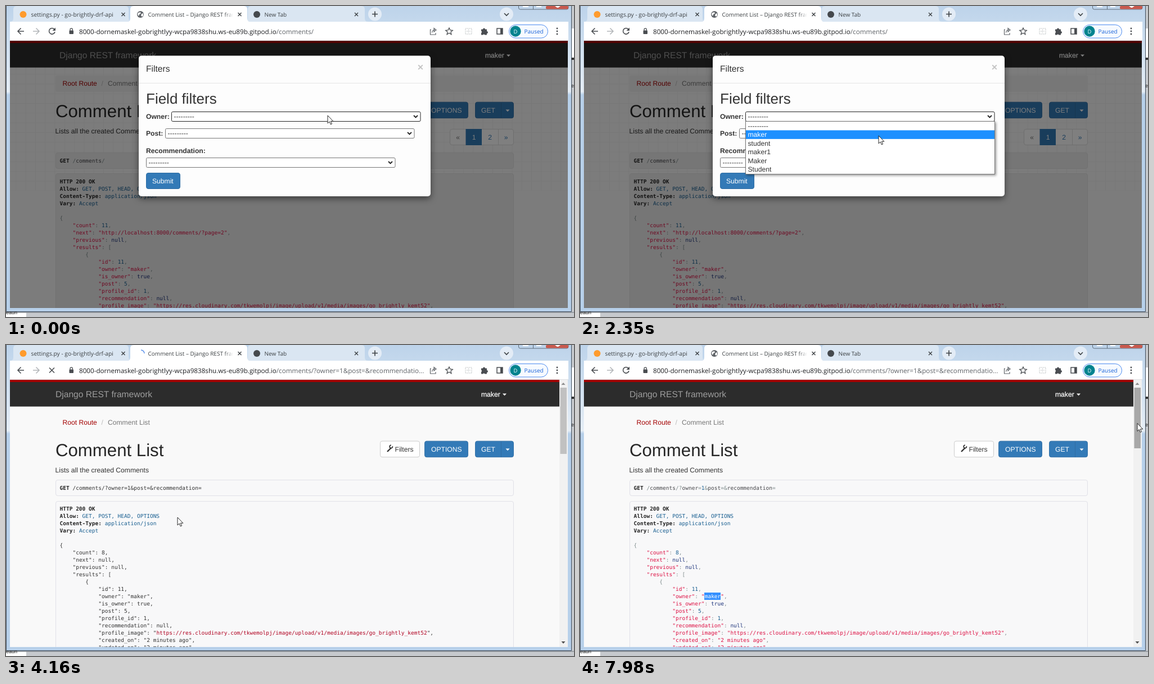
These frames come from a looping animation (1010 px wide and 554 px high, 8 s). An HTML page:

```html
<!DOCTYPE html>
<html lang="en">
<head>
<meta charset="utf-8">
<style>
html, body { margin: 0; width: 100%; height: 100%; overflow: hidden; background: #fff; }
svg { display: block; width: 1010px; height: 554px; }
text { font-family: "Liberation Sans", Arial, sans-serif; white-space: pre; text-rendering: geometricPrecision; }
.ui { font-family: "Open Sans", "Noto Sans", sans-serif; }
.mono { font-family: "DejaVu Sans Mono", monospace; }
.plain .tok { fill: #333; }
.plain .url { fill: #b00020; }
.hover .url { text-decoration: underline; }
#modalBox { filter: drop-shadow(0 4px 6px rgba(0,0,0,.5)); }
#list { filter: drop-shadow(2px 2px 2px rgba(0,0,0,.4)); }
</style>
</head>
<body>
<svg id="stage" viewBox="0 0 1010 554"></svg>
<script>
const BASE = 12.14, RED = '#dd1144', LIT = '#195f91', BLUE = '#337ab7';
const OPTIONS = ['---------', 'maker', 'student', 'maker1', 'Maker', 'Student'];
const HOST = '8000-dornemaskel-gobrightlyy-wcpa9838shu.ws-eu89b.gitpod.io';
const IMAGE = 'https://res.cloudinary.com/tkwemolpj/image/upload/v1/media/images/go_brightly_kemt52';
const safe = s => s.replace(/&/g, '&amp;');

const text = (x, y, s, size = BASE, fill = '#333', more = '') =>
  `<text x="${x}" y="${y}" font-size="${size}" fill="${fill}" ${more}>${s}</text>`;
const ui = (x, y, s, size = 10, fill = '#3c4043', more = '') => text(x, y, s, size, fill, `class="ui" ${more}`);
const rect = (x, y, w, h, fill, more = '') =>
  `<rect x="${x}" y="${y}" width="${w}" height="${h}" fill="${fill}" ${more}/>`;
const line = (d, color = '#5f6368', width = 1.5, more = '') =>
  `<path d="${d}" fill="none" stroke="${color}" stroke-width="${width}" ${more}/>`;
const shape = (d, fill, more = '') => `<path d="${d}" fill="${fill}" ${more}/>`;
const dot = (x, y, r, fill, more = '') => `<circle cx="${x}" cy="${y}" r="${r}" fill="${fill}" ${more}/>`;
const group = (id, body, more = '') => `<g id="${id}" ${more}>${body}</g>`;
const span = (s, fill, cls = 'tok') => `<tspan class="${cls}" fill="${fill}">${safe(s)}</tspan>`;
const bold = s => `<tspan font-weight="700" fill="#222">${s}</tspan>`;
const caret = (x, y, fill) => shape(`M${x - 3.5} ${y - 1.5}h7l-3.5 3.7z`, fill);
const mono = (y, s) => text(95.5, y, s, 9.53, '#333', 'class="mono"');

// Syntax colouring
function paint(s) {
  return s.replace(/"[^"]*"|\d+|[a-z_]+|[^"\da-z_]+/g, m => {
    if (m.startsWith('"http')) return span('"', RED) + span(m.slice(1, -1), RED, 'tok url') + span('"', RED);
    if (m[0] === '"') return span(m, RED);
    if (/\d/.test(m)) return span(m, LIT);
    if (/^(null|true)$/.test(m)) return span(m, '#1e347b');
    return span(m, /[a-z]/.test(m) ? '#48484c' : '#7f8c8c');
  });
}

function response(count, next) {
  const head = [['Allow', 'GET, POST, HEAD, OPTIONS'], ['Content-Type', 'application/json'], ['Vary', 'Accept']]
    .map(([k, v]) => bold(k + ':') + span(' ' + v, LIT, ''));
  const top = [`"count": ${count},`, `"next": ${next},`, '"previous": null,', '"results": [', '    {'];
  const item = ['"id": 11,', '"owner": "maker",', '"is_owner": true,', '"post": 5,', '"profile_id": 1,',
    '"recommendation": null,', `"profile_image": "${IMAGE}",`, '"created_on": "2 minutes ago",', '"updated_on": "2 minutes ago",'];
  return [bold('HTTP 200 OK'), ...head, '', paint('{'),
    ...top.map(s => paint('    ' + s)), ...item.map(s => paint(' '.repeat(12) + s))];
}

function page(dim) {
  const shift = dim ? 21 : 0, nav = dim ? 7 : 0, right = dim ? 999 : 984;
  const well = dim ? '#ededed' : '#f8f8f9', edge = `stroke="${dim ? '#e4e4e4' : '#e1e1e8'}"`;
  const button = (x, w) => rect(x + .5, 171.2, w, 28.5, BLUE, 'rx="3.5" stroke="#2e6da4" stroke-width=".9"');
  let s = rect(7, 62, 992, 476, '#f9f9f9');
  if (dim) s += rect(7, 109, 992, 220, 'url(#grid)');
  s += rect(7, 62, right - 7, 47.6, '#2c2c2c') + rect(7, 62, right - 7, 4, '#a30000')
    + text(88 + nav, 92.5, 'Django REST framework', 15.6, '#9d9d9d')
    + text(845 + nav, 92, 'maker', BASE, '#fff', 'stroke="#fff" stroke-width=".25"') + caret(886.5 + nav, 88, '#fff')
    + rect(88, 123.5, 815, 29.5, dim ? '#efefef' : '#f9f9f9', 'rx="3.5"')
    + text(100.5, 142, 'Root Route', BASE, '#a30000') + text(169.5, 142, '/', BASE, '#bbb')
    + text(181, 142, 'Comment List', BASE, '#777')
    + text(88, 198, 'Comment List', 31.2, '#262626') + text(87.5, 227, 'Lists all the created Comments')
    + rect(665.5, 171.2, 70, 28.5, '#fff', 'rx="3.5" stroke="#ccc"') + text(691.5, 190, 'Filters')
    + line('M678 190l6.5-6.5', '#333', 2.4) + line('M687.3 180.4a2.6 2.6 0 1 1-2.5-2', '#333', 1.8)
    + button(744, 77) + text(756, 190, 'OPTIONS', BASE, '#fff')
    + button(834, 68) + text(845, 190, 'GET', BASE, '#fff') + line('M880.5 172v28', '#2e6da4', 1) + caret(892, 186, '#fff');
  if (dim) {
    s += rect(789.5, 219.5, 113, 28, '#fff', 'rx="3.5" stroke="#ddd"') + line('M875.5 219v29', '#ddd', 1)
      + rect(817.5, 219, 28.5, 29, BLUE)
      + ['«', '1', '2', '»'].map((c, i) => text(803.5 + i * 28.5, 238, c, BASE, ['#777', '#fff', BLUE, BLUE][i], 'text-anchor="middle"')).join('');
  }
  const query = dim ? '' : '?owner=1&post=&recommendation=';
  s += rect(88.5, 240.5 + shift, 814, 28, well, `rx="3.5" ${edge}`)
    + mono(257.5 + shift, bold('GET') + paint(' /comments/' + query))
    + rect(88.5, 278.5 + (dim ? 20 : 0), 814, 300, well, `rx="3.5" ${edge}`)
    + response(dim ? 11 : 8, dim ? '"http://localhost:8000/comments/?page=2"' : 'null')
      .map((l, i) => mono(295 + shift + 13 * i, l)).join('');
  return s + (dim ? rect(7, 62, 992, 476, '#000', 'opacity=".5"') : '');
}

const select = (x, y, value, id) =>
  rect(x + .5, y + .5, 442.5, 17, '#fff', `id="${id}" rx="2" stroke="#767676"`)
  + text(x + 4.5, y + 13, value, BASE, '#333', `id="${id}Text"`)
  + line(`M${x + 431} ${y + 7}l3.5 3.5 3.5-3.5`, '#222', 1.8);
const label = (y, s) => text(249, y, s, BASE, '#333', 'font-weight="700"');

const modal = group('modalBox', rect(236, 88.5, 519, 250.5, '#fdfdfd', 'rx="5"'))
  + text(249, 117, 'Filters', 15.6) + text(737, 115, '×', 18, '#c4c4c4', 'text-anchor="middle" font-weight="700"')
  + rect(236, 137, 519, 1, '#e5e5e5') + text(249, 174, 'Field filters', 26)
  + label(201, 'Owner:') + select(294, 188, OPTIONS[0], 'owner')
  + label(231, 'Post:') + select(283, 218, OPTIONS[0], 'post')
  + label(262, 'Recommendation:') + select(249, 270, OPTIONS[0], 'rec')
  + group('ring', rect(248.5, 296.5, 62, 30, '#fff', 'rx="4.5" stroke="#111"'))
  + rect(249.5, 297.5, 60, 28, BLUE, 'id="submit" rx="3.5" stroke="#2e6da4"')
  + text(260, 315.5, 'Submit', BASE, '#fff')
  + group('list', rect(294.5, 205.5, 443, 94, '#fff', 'stroke="#767676"')
    + rect(295, 206, 442, 15.5, '#1e90ff', 'id="pick"')
    + OPTIONS.map((s, i) => text(298.5, 218 + 15.4 * i, s, BASE, '#333', 'class="option"')).join(''));

const cross = x => line(`M${x - 3} 12l6 6m0-6l-6 6`, '#3c4043', 1.4);
const frame = rect(0, 0, 1010, 554, '#c6c9cd')
  + rect(1006, 40, 4, 52, '#fff') + rect(1006, 92, 4, 4, '#333')
  + text(1005, 145, 'e', 9, '#222')
  + rect(0, 0, 1005.5, 545, 'url(#glass)') + line('M.5 0V544.5H1005.5V0', '#3f4d5c', 1)
  + rect(0, 546, 36, 8, '#fff') + rect(0, 545, 1010, 1.5, '#8d939a') + text(0, 549, 'eaun', 9, '#222');
const controls = line('M911.5 0V3q0 3 3 3H997q3 0 3-3V0M937.5 0V6', '#5d6b7a', 1)
  + rect(960, 0, 40, 5.5, '#c9594d', 'rx="2"') + rect(919, 0, 10, 2, '#fff') + rect(943, 0, 9, 2, '#fff')
  + shape('M976 0l4 3h2l4-3z', '#fff');

const tabs = shape('M7 28q6 0 6-6V6q0-6 6-6H212q6 0 6 6V22q0 6 6 6z', '#dae6f2')
  + shape('M424 28q6 0 6-6V6q0-6 6-6H632q6 0 6 6V22q0 6 6 6z', '#dae6f2')
  + shape('M214 29q7 0 7-7V6q0-6 6-6H423q6 0 6 6V22q0 7 7 7z', '#fff')
  + dot(30.5, 15, 6, '#ff9b2d') + ui(44.5, 18.5, 'settings.py - go-brightly-drf-api', 10.25)
  + dot(446, 15, 6, '#45494d') + ui(459.5, 18.5, 'New Tab')
  + cross(208.5) + cross(415.5) + cross(623)
  + group('globe', dot(239, 15, 6, '#5f6368') + shape('M235 12l4-1 1 2-3 2-1 3-2-3zM241 14l3-1 0 4-2 2-2-2z', '#fff'))
  + group('spinner', line('M240 9a6 6 0 0 1 6 6', '#5c92ea', 1.6))
  + ui(252.5, 18.5, '', 10, '#3c4043', 'id="title" clip-path="url(#tabClip)"') + rect(388, 6, 16, 18, 'url(#fade)')
  + dot(656, 14.5, 12, '#e3ecf6') + line('M651 14.5h10m-5-5v10', '#3c4043', 1.6)
  + dot(890, 14.5, 12, '#e3ecf6') + line('M886 13l4 4 4-4', '#3c4043', 1.6);

const toolbar = rect(7, 28, 993, 34, '#fff') + rect(7, 61, 993, 1, '#dcdfe3')
  + line('M32 45H21m5.5-5.5l-5.5 5.5 5.5 5.5', '#4a4d51', 1.6)
  + line('M48 45h11m-5.5-5.5l5.5 5.5-5.5 5.5', '#b4b7ba', 1.6)
  + group('reload', line('M86 41.5a5.3 5.3 0 1 0 1 4.5', '#4a4d51', 1.6) + shape('M88 38.5v5.5h-5.5z', '#4a4d51'))
  + group('stop', line('M77 40.5l9 9m0-9l-9 9', '#4a4d51', 1.6))
  + rect(112.5, 43.5, 7.5, 6.5, '#4a4d51', 'rx="1"') + line('M114 44v-2a2.2 2.2 0 0 1 4.4 0v2', '#4a4d51', 1.2)
  + text(130, 49.5, span(HOST, '#202124', '') + '<tspan id="path"></tspan>', 11.67, '#5f6368', 'class="ui"')
  + line('M756 42h-1.5v9h9.5v-3M757.5 47.5q.5-5 5.5-5M761 39.500l4 3.2-4 3.2z', '#5f6368', 1.2)
  + line('M788 39l1.8 4 4.4.4-3.3 2.9 1 4.3-3.9-2.3-3.9 2.3 1-4.3-3.3-2.9 4.4-.4z', '#4a4d51', 1.3)
  + line('M817 40h11v10h-11zM819 45h7m-3.5-3.5v7', '#d5d7d9', 1.5, 'stroke-dasharray="2 1"')
  + shape('M845 41.5h3a2 2 0 0 1 4 0h3v3.5a2 2 0 0 1 0 4v2.5h-3.5a2 2 0 0 0-3.5 0h-3v-3.5a2 2 0 0 0 0-3.5z', '#4a4d51')
  + line('M873 40h10v10h-10z', '#4a4d51', 1.5) + rect(879, 40, 4, 10, '#4a4d51')
  + rect(894.5, 33.5, 69, 23.5, '#f6faff', 'rx="11.7" stroke="#4b8bf0"')
  + dot(906, 45, 9.7, '#00838f') + ui(906, 48.5, 'D', 9.5, '#fff', 'text-anchor="middle"')
  + ui(921.5, 48.5, 'Paused', 10, '#1a63d8')
  + [40, 45, 50].map(y => dot(980, y, 1.4, '#4a4d51')).join('');

const scrollbar = rect(984, 62, 15, 476, '#f1f1f1') + rect(985.5, 76, 11.5, 118, '#c1c1c1', 'id="thumb"')
  + shape('M987.5 71h7l-3.5-4z', '#8c8c8c') + shape('M987.5 528h7l-3.5 4z', '#505050');

const pointer = group('arrow', shape('M0 0V14l3.2-3 2.1 5 2.2-1-2.1-4.7H9.8z', '#fff', 'stroke="#111" stroke-width=".9"'))
  + group('beam', line('M-3-6.5h2.2l.8.8.8-.8H3M0-6V6M-3 6.5h2.2l.8-.8.8.8H3', '#111', 1))
  + group('hand', shape('M-1 0q1.2-1 2.2 0v6l6 1.5q1 .5.8 2l-1 6.5h-7l-4-6q0-1.5 2-1l1 1z', '#fff', 'stroke="#111" stroke-width=".9"'));

document.getElementById('stage').innerHTML = `<defs>
  <linearGradient id="glass" x2="0" y2="1"><stop offset="0" stop-color="#bdd3ea"/><stop offset=".06" stop-color="#c5d9ed"/>
    <stop offset=".28" stop-color="#e6eef6"/><stop offset=".29" stop-color="#b7d0ea"/><stop offset="1" stop-color="#b7d0ea"/></linearGradient>
  <linearGradient id="fade"><stop offset="0" stop-color="#fff" stop-opacity="0"/><stop offset="1" stop-color="#fff"/></linearGradient>
  <pattern id="grid" width="17.3" height="17.3" patternUnits="userSpaceOnUse">${line('M0 .5H18M.5 0V18', '#f0f0f0', 1)}</pattern>
  <clipPath id="tabClip"><rect x="250" y="0" width="154" height="28"/></clipPath>
  <clipPath id="view"><rect x="7" y="62" width="992" height="476"/></clipPath></defs>`
  + frame + controls + tabs + toolbar
  + `<g clip-path="url(#view)">`
  + group('before', page(true) + modal)
  + group('after', page(false) + scrollbar
    + group('marked', rect(221, 441, 29, 13, '#3390ff') + text(221.7, 451, 'maker', 9.53, '#fff', 'class="mono"')))
  + '</g>' + group('cursor', pointer);

const $ = id => document.getElementById(id);
const show = (id, on) => $(id).setAttribute('visibility', on ? 'inherit' : 'hidden');
const fill = (id, color) => $(id).setAttribute('fill', color);
const write = (id, s) => { if ($(id).textContent !== s) $(id).textContent = s; };

// Pointer moves: start, end, steps, target x, target y
const MOVES = [
  [1020, 1270, 5, 531, 243], [1680, 1930, 4, 531, 237], [2240, 2350, 3, 531, 231], [3000, 3530, 10, 305, 307],
  [4890, 5310, 8, 272, 510], [5370, 5670, 6, 235, 462], [5750, 6110, 7, 235, 447.5],
  [6960, 7140, 4, 892, 218], [7320, 7980, 11, 991, 139.5]];

function pointerAt(t) {
  let x = 572, y = 195;
  for (const [start, end, steps, tx, ty] of MOVES) {
    if (t < start) break;
    const step = Math.min(steps, Math.floor((t - start) / (end - start) * (steps - 1) + .1) + 1);
    const k = 1 - (1 - step / steps) ** 2.2;
    x += (tx - x) * k;
    y += (ty - y) * k;
  }
  return [x, y];
}

function draw(t) {
  const [x, y] = pointerAt(t);
  const loaded = t >= 4160, sent = t >= 3890, busy = sent && t < 4320;
  show('before', !loaded);
  show('after', loaded);

  const open = t >= 420 && t < 2780;
  const picked = t < 1140 ? 0 : t < 1200 ? 1 : t < 2290 ? 2 : 1;
  $('list').style.display = open ? '' : 'none';
  $('pick').setAttribute('y', 206 + 15.4 * picked);
  document.querySelectorAll('.option').forEach((o, i) => o.setAttribute('fill', i === picked ? '#fff' : '#333'));
  write('ownerText', OPTIONS[t < 2780 ? 0 : 1]);
  $('owner').setAttribute('stroke', t < 3710 ? '#222' : '#767676');
  const pressed = t >= 3710;
  $('ring').style.display = pressed ? '' : 'none';
  fill('submit', t >= 3470 ? '#286090' : BLUE);
  $('submit').setAttribute('stroke', pressed ? '#10151a' : '#2e6da4');
  $('submit').setAttribute('stroke-width', pressed ? 2 : 1);

  write('title', sent && !loaded ? 'https://' + HOST : 'Comment List – Django REST framework');
  write('path', '/comments/' + (sent ? '?owner=1&post=&recommendatio...' : ''));
  show('globe', !busy);
  show('spinner', busy);
  $('spinner').setAttribute('transform', `rotate(${(t - 4160) * .36} 240 15)`);
  show('reload', !busy);
  show('stop', busy);

  const overLink = t > 4900 && y > 505;
  $('after').setAttribute('class', (t < 4210 ? 'plain' : '') + (overLink ? ' hover' : ''));
  $('thumb').setAttribute('height', t < 4210 ? 118 : 108);
  fill('thumb', x > 985 ? '#a8a8a8' : '#c1c1c1');
  $('marked').style.display = t >= 6570 ? '' : 'none';

  const beam = t >= 4890 && t < 7140 && !overLink;
  show('beam', beam);
  show('hand', overLink);
  show('arrow', !beam && !overLink);
  $('cursor').setAttribute('transform', `translate(${x} ${y})`);
}

const begin = performance.now();
function tick() {
  draw((performance.now() - begin) % 8000);
  requestAnimationFrame(tick);
}
tick();
</script>
</body>
</html>
```
